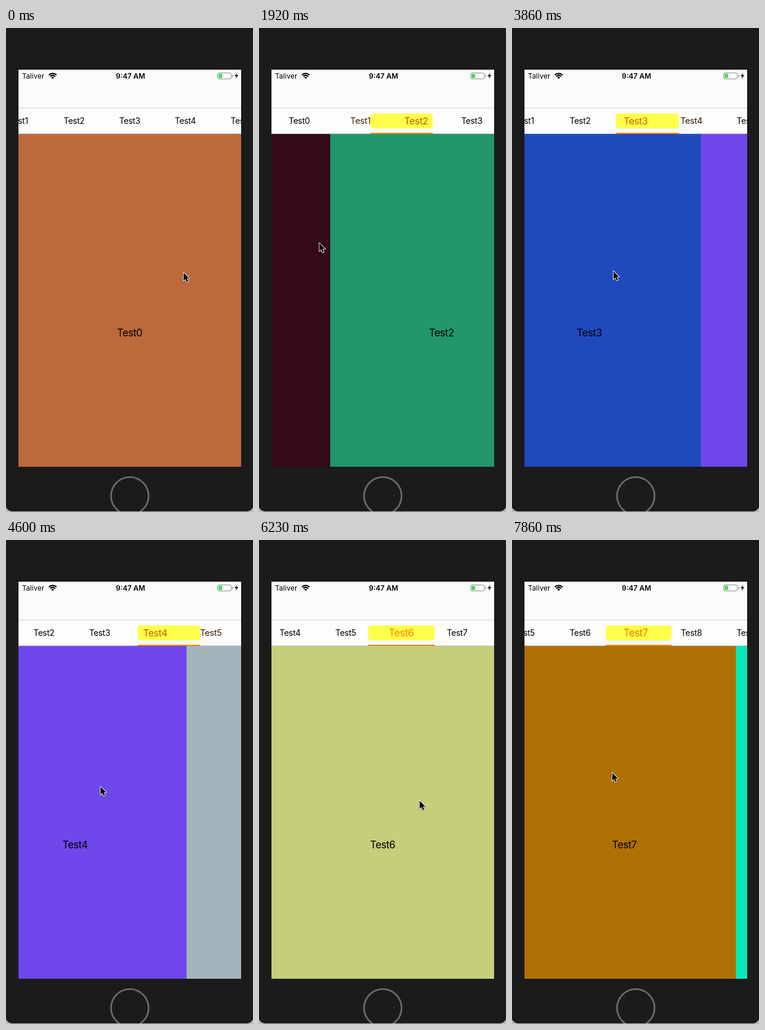
An HTML page with a canvas for the animation above (8000 ms loop, 416 px wide and 813 px high).

```html
<!DOCTYPE html>
<html lang="en">
<head>
<meta charset="utf-8">
<title>Tab strip pager</title>
<style>
  html, body { margin: 0; width: 100%; height: 100%; overflow: hidden; background: #1b1b1b; }
  canvas { display: block; width: 416px; height: 813px; }
</style>
</head>
<body>
<canvas id="stage"></canvas>
<script>
const W = 416, H = 813, LOOP = 8000, STEP = 148.3, LAST_STEP = 53;
const LEFT = 21, TOP = 70, WIDTH = 375, BOTTOM = 737, PAGE_TOP = 178;
const TAB = WIDTH / 4, ZOOM = 0.2, TABS = 10;
const SWIPE = 700, RECENTER = 300, RELEASE = 0.4;
const FONT = 'Inter, "Open Sans", sans-serif';
const COLORS = ['#be693c', '#350918', '#23966b', '#2149be', '#6f47eb',
  '#a3b5bb', '#c6ce79', '#b07104', '#09e7ba'];

// When and where the pointer grabs each page
const SWIPES = [
  { start: 500, x: 298, y: 410 }, { start: 1567, x: 284, y: 389 },
  { start: 2753, x: 271, y: 417 }, { start: 3739, x: 248, y: 420 },
  { start: 4460, x: 250, y: 428 }, { start: 5345, x: 231, y: 429 },
  { start: 6480, x: 329, y: 447 }, { start: 7831, x: 187, y: 393 }
];

const canvas = document.getElementById('stage');
const ctx = canvas.getContext('2d');
const ratio = window.devicePixelRatio || 1;
canvas.width = W * ratio;
canvas.height = H * ratio;

const clamp = v => Math.min(1, Math.max(0, v));
const lerp = (a, b, k) => a + (b - a) * k;
const smooth = v => { const k = clamp(v); return k * k * (3 - 2 * k); };

// Steady drag over half a page, then a decelerating glide
function glide(v) {
  const u = clamp(v);
  if (u < RELEASE) return 0.5 * u / RELEASE;
  return 1 - 0.5 * Math.pow((1 - u) / (1 - RELEASE), 3);
}

const pageAt = t => SWIPES.reduce((p, s) => p + glide((t - s.start) / SWIPE), 0);
const nearness = (i, p) => Math.max(0, 1 - Math.abs(i - p));

function tabCenter(i, p) {
  const shift = TAB * ZOOM / 2;
  return TAB * (i + 0.5) + (i ? shift : shift * nearness(0, p));
}

// The strip recenters after each page comes to rest
function stripAt(t) {
  const centered = i => Math.max(0, tabCenter(i, i) - WIDTH / 2);
  const rests = [100, ...SWIPES.map(s => s.start + SWIPE)];
  return rests.reduce((off, rest, i) =>
    lerp(off, centered(i), smooth((t - rest) / RECENTER)), centered(3));
}

// The pointer drags a page along, then returns for the next grab
function pointerAt(t) {
  const i = SWIPES.findLastIndex(s => s.start <= t);
  if (i < 0) return SWIPES[0];
  const s = SWIPES[i], next = SWIPES[i + 1] || s;
  const dragged = Math.min(0.5, glide((t - s.start) / SWIPE));
  const release = s.start + SWIPE * RELEASE;
  const back = t > release ? smooth((t - release) / (next.start - release)) : 0;
  return {
    x: lerp(s.x - WIDTH * dragged, next.x, back),
    y: lerp(s.y - 60 * dragged, next.y, back)
  };
}

function rect(x, y, w, h, color) {
  ctx.fillStyle = color;
  ctx.fillRect(x, y, w, h);
}

function roundRect(x, y, w, h, r) {
  ctx.beginPath();
  ctx.roundRect(x, y, w, h, r);
}

function polygon(points) {
  ctx.beginPath();
  points.forEach(([x, y]) => ctx.lineTo(x, y));
  ctx.closePath();
}

// Text centered vertically on its capitals
function label(text, x, y, size, color, { align = 'center', weight = 400, spacing = 0 } = {}) {
  const gap = spacing * size;
  ctx.font = `${weight} ${size}px ${FONT}`;
  ctx.letterSpacing = `${gap}px`;
  ctx.textAlign = align;
  ctx.fillStyle = color;
  ctx.fillText(text, x + gap / 2, y + size * 0.364);
}

function drawDevice() {
  rect(0, 0, W, H, '#b8b8b8');
  rect(0, 0, 3, 4, '#4b8fc0');
  ctx.fillStyle = '#1b1b1b';
  roundRect(-1, -1, W + 2, H, [4, 4, 12, 12]);
  ctx.fill();
  ctx.save();
  ctx.beginPath();
  ctx.rect(0, BOTTOM, W, 812 - BOTTOM);
  ctx.clip();
  ctx.beginPath();
  ctx.arc(208.5, 786, 31.6, 0, Math.PI * 2);
  ctx.strokeStyle = '#6b6b6b';
  ctx.lineWidth = 2.8;
  ctx.stroke();
  ctx.restore();
}

function drawWifi(x, y) {
  const arc = r => ctx.arc(x, y, r, -Math.PI * 0.75, -Math.PI * 0.25);
  ctx.strokeStyle = ctx.fillStyle = '#000';
  ctx.lineWidth = 2.2;
  for (const r of [9.2, 5.8]) {
    ctx.beginPath();
    arc(r);
    ctx.stroke();
  }
  ctx.beginPath();
  ctx.moveTo(x, y);
  arc(3.4);
  ctx.fill();
}

function drawBattery() {
  ctx.strokeStyle = '#8c8c8c';
  ctx.lineWidth = 1;
  roundRect(356.5, 75.5, 23, 10, 2.5);
  ctx.stroke();
  rect(358, 77, 6, 7, '#4cd964');
  rect(381, 78.5, 1.3, 4, '#8c8c8c');
  ctx.fillStyle = '#000';
  polygon([[389.5, 75], [385, 81], [388, 81], [386.6, 85.5], [391.3, 79.2], [388.2, 79.2]]);
  ctx.fill();
}

function drawBars() {
  rect(LEFT, TOP, WIDTH, 64, '#fbfbfb');
  rect(LEFT, 134, WIDTH, 1, '#d0d0d0');
  rect(LEFT, 135, WIDTH, 42, '#fdfdfd');
  rect(LEFT, 177, WIDTH, 1, '#d0d0d0');
  label('Taliver', 27, 80.2, 12, '#000', { align: 'left' });
  label('9:47 AM', 209.7, 80.2, 12, '#000', { weight: 600 });
  drawWifi(78.6, 85.5);
  drawBattery();
}

function drawTabs(p, off) {
  const i = Math.floor(p), f = p - i;
  const x = k => LEFT + tabCenter(k, p) - off;
  const scale = k => 1 + ZOOM * nearness(k, p);
  const w = TAB * lerp(scale(i), scale(i + 1), f);
  const left = lerp(x(i), x(i + 1), f) - w / 2;

  ctx.fillStyle = '#fffe4b';
  roundRect(left, 143.5, w, 25, 5);
  ctx.fill();
  rect(left, 176, w, 2, '#ff8000');
  for (let k = 0; k < TABS; k++) {
    const n = nearness(k, p);
    const color = `rgb(${Math.round(255 * n)}, ${Math.round(128 * n)}, 0)`;
    label('Test' + k, x(k), 156, 14 * scale(k), color, { spacing: -0.02 });
  }
}

function drawPages(p) {
  const first = Math.floor(p);
  for (let i = first; i <= first + 1 && i < COLORS.length; i++) {
    const x = Math.round(LEFT + (i - p) * WIDTH);
    rect(x, PAGE_TOP, WIDTH, BOTTOM - PAGE_TOP, COLORS[i]);
    label('Test' + i, x + WIDTH / 2, 511.7, 17, '#000', { spacing: -0.027 });
  }
}

function drawPointer({ x, y }) {
  ctx.save();
  ctx.translate(x + 0.7, y + 1);
  ctx.scale(0.93, 0.93);
  polygon([[0.5, 0], [0.5, 14.6], [3.8, 11.5], [6.2, 16.9], [8.6, 15.9], [6.3, 10.6], [10.8, 10.4]]);
  ctx.lineJoin = 'round';
  ctx.lineWidth = 2;
  ctx.strokeStyle = '#fff';
  ctx.shadowColor = 'rgba(0, 0, 0, 0.35)';
  ctx.shadowBlur = 2 * ratio;
  ctx.shadowOffsetY = ratio;
  ctx.stroke();
  ctx.shadowColor = 'transparent';
  ctx.fillStyle = '#000';
  ctx.fill();
  ctx.restore();
}

function draw(t) {
  const p = pageAt(t);
  ctx.setTransform(ratio, 0, 0, ratio, 0, 0);
  drawDevice();
  ctx.save();
  ctx.beginPath();
  ctx.rect(LEFT, TOP, WIDTH, BOTTOM - TOP);
  ctx.clip();
  drawBars();
  drawTabs(p, stripAt(t));
  drawPages(p);
  ctx.restore();
  drawPointer(pointerAt(t));
}

// The picture advances in discrete steps, like a screen recording
function tick() {
  const t = performance.now() % LOOP;
  draw(Math.min(LAST_STEP, Math.floor((t + 12) / STEP)) * STEP);
  requestAnimationFrame(tick);
}
tick();
</script>
</body>
</html>
```
